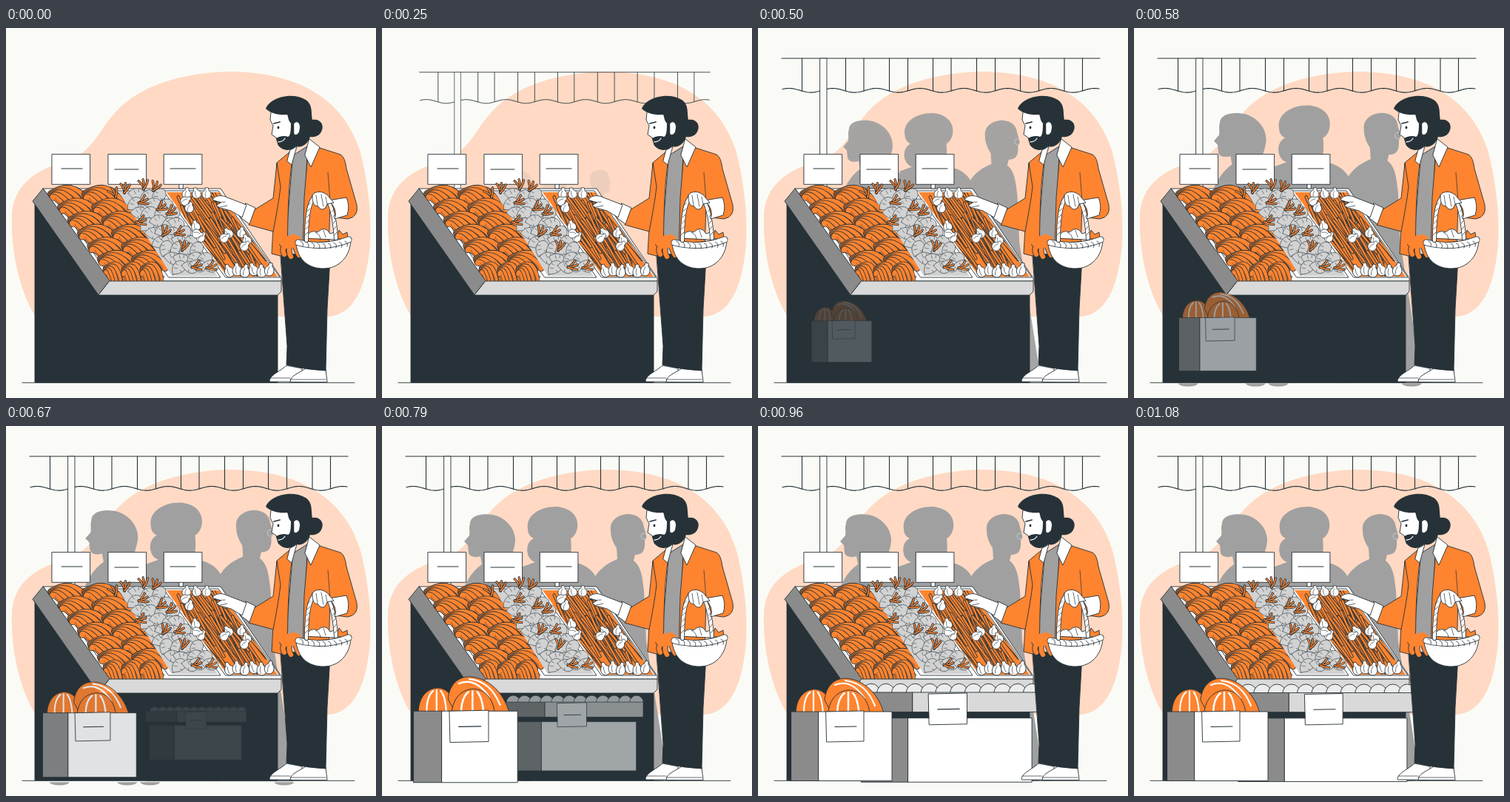
An HTML page for the animation above (1.12 s loop, 500 by 500 pixels).

```html
<!DOCTYPE html>
<html lang="en">
<head>
<meta charset="utf-8">
<title>Market stall</title>
<style>
  html, body { margin: 0; width: 100%; height: 100%; overflow: hidden; background: #fafbf6; }
  svg { display: block; width: 100vw; height: 100vh; }
</style>
</head>
<body>
<svg id="stage" viewBox="0 0 500 500" stroke-linejoin="round" stroke-linecap="round"></svg>
<script>
const INK = '#263238', ORANGE = '#ff8430', GREY = '#a0a0a0', SIDE = '#8b8b8b',
      PALE = '#d9d9d9', ROOT = '#d2d2d2', WHITE = '#fff', PEACH = '#ffd9c3';

let seed = 11;
const rnd = () => (seed = (seed * 16807) % 2147483647) / 2147483647;
const range = n => [...Array(n).keys()];
const each = (n, fn) => range(n).map(fn).join('');

const shape = (d, fill = 'none', stroke = INK, w = 0.9) =>
  `<path d="${d}" fill="${fill}" stroke="${stroke}" stroke-width="${w}"/>`;
const flat = (d, fill) => shape(d, fill, 'none');
const line = (d, w = 0.9, color = INK) => shape(d, 'none', color, w);
const rect = (x1, y1, x2, y2, fill) => shape(`M${x1} ${y1}H${x2}V${y2}H${x1}Z`, fill);
const at = (x, y, turn, sx, sy, body) =>
  `<g transform="translate(${x} ${y}) rotate(${turn}) scale(${sx} ${sy})">${body}</g>`;
const tube = (d, w, fill) => line(d, w) + line(d, w - 1.7, fill);
const group = (id, body) => `<g id="${id}">${body}</g>`;

// ---- backdrop
const blob = flat('M40 390C18 355 6 300 8 252C10 214 38 192 78 181C126 166 122 132 165 98' +
  'C205 68 262 59 305 59C392 60 455 94 478 165C492 215 497 280 488 322C480 365 462 388 436 390Z', PEACH);

function awning() {
  const edge = x => 84.3 - 2.8 * Math.cos((x - 42) / 59 * 2 * Math.PI);
  const wave = range(215).map(i => `${33 + i * 2} ${edge(33 + i * 2).toFixed(1)}`).join('L');
  const folds = [59.5, 118.5, 143, 177.5, 202.5, 236.5, 261, 295.5, 320.5, 354.5, 379.5, 414, 438.5];
  return line('M32 41H462', 1.1) + line('M' + wave, 1.1) +
    folds.map(x => line(`M${x} 41V${edge(x)}`, 1.1)).join('') +
    rect(84, 41, 93, 300, '#fafbf6');
}

function people() {
  const left = 'M119 132C119 119 140 117 154 121C171 127 180 141 180 154C180 166 174 172 176 183' +
    'C192 186 200 210 202 250L206 472H70L100 250C110 212 122 196 135 187L133 176C126 178 118 177 117 171' +
    'L116 161L111 156L118 148C119 142 117 137 119 132Z';
  const middle = 'M197 139C194 122 212 109 235 109C255 110 266 122 264 137C263 144 260 149 255 152' +
    'C257 168 254 176 255 183C278 187 290 198 293 216L285 475H190V190L207 184C194 180 192 158 205 152' +
    'C199 149 197 144 197 139Z';
  const right = 'M309 140C308 126 321 119 334 119C347 120 353 127 354 137L358 150L355 155C356 167 353 174 342 174' +
    'L340 182C351 190 352 207 354 222L357 290L383 455V475H280V225C285 202 296 189 318 180L317 165' +
    'C312 157 309 150 309 140Z';
  const feet = [76, 165, 195, 371].map(x => flat(`M${x - 12} 476a13 4 0 0 0 26 0Z`, GREY)).join('');
  return [left, middle, right].map(d => flat(d, GREY)).join('') + feet +
    `<circle cx="354" cy="149" r="4" fill="none" stroke="#fff" stroke-width=".6" opacity=".65"/>`;
}

// ---- stall
function bananas() {
  const bunch = each(5, k => tube(
    `M${1 + k * 0.6} ${10 + k * 1.4}Q${32 - k * 7} ${-10 + k * 5} ${51 - k * 8} ${20 + Math.min(k, 2) * 3}`, 8.4, ORANGE) +
    line(`M${6 + k * 0.5} ${8 + k * 2}Q${29 - k * 6} ${-4 + k * 5} ${48 - k * 8} ${19 + Math.min(k, 2) * 3}`, 0.6));
  let out = flat('M62 216L138 222L211 334L142 334Z', ORANGE);
  for (let r = 0; r < 6; r++)
    for (let c = 0; c < 2; c++) out += at(59 + r * 13.4 + c * 46, 214 + r * 17.6, 0, 1, 1, bunch);
  return out + each(3, c => at(135 + c * 25, 315, 12, 0.6, 1.08, bunch));
}

const root = shape('M-14 1C-9-9 4-11 9-3C12 2 8 9 1 9C-5 9-10 4-14 1Z', ROOT, INK, 0.6) +
  line('M-6-4l3 4M0-7l1 4M-2 8l-1-3', 0.5);
const leaves = [-34, -4, 26].map(a => at(0, 0, a, 1, 1, tube('M0 1Q2-6 0-13', 3.4, ORANGE))).join('');

function roots() {
  let out = flat('M152 221L207 221L286 335L224 335Z', ROOT);
  for (let r = 0; r < 9; r++)
    for (let c = 0; c < 4; c++) {
      const x = 163 + r * 8.7 + c * 14 + rnd() * 4, y = 224 + r * 12 + rnd() * 5;
      if (r || c > 0) out += at(x.toFixed(1), y.toFixed(1), Math.round(rnd() * 90 - 70), 0.95, 0.95, root);
    }
  const tufts = [[148, 228, -20], [160, 222, 10], [186, 217, 0], [199, 219, 30], [180, 236, 70], [205, 245, 60],
    [177, 262, 80], [218, 251, 60], [212, 280, 30], [229, 278, 70], [238, 300, 20], [252, 323, 80], [272, 324, 75]];
  return out + tufts.map(([x, y, a]) => at(x, y, a, 0.95, 0.95, leaves)).join('');
}

const bulb = shape('M-2-8L2-8L3-4C9-1 8 8 1 8C-7 9-9-1-3-4Z', WHITE, INK, 0.8) + line('M-1-3Q-3 2-1 6', 0.6);

function stalks() {
  const bed = 'M217 222H288L367 336H299Z';
  let sticks = '';
  for (let i = 0; i < 60; i++) {
    const y = 220 + rnd() * 80, x = 216 + (y - 217) * 0.69 + rnd() * 66;
    const len = 34 + rnd() * 16, tilt = 0.4 + rnd() * 0.5;
    sticks += tube(`M${x.toFixed(1)} ${y.toFixed(1)}l${(len * tilt).toFixed(1)} ${len.toFixed(1)}`, 4.2, ORANGE);
  }
  const bulbs = [[244, 223, 10], [257, 223, -15], [271, 223, 5], [243, 233, 60], [248, 242, 20],
    [256, 267, -10], [264, 282, 40], [259, 278, 100], [300, 277, -30], [296, 283, 60], [318, 276, 10], [325, 286, -20], [323, 294, 50]];
  return `<clipPath id="bed"><path d="${bed}"/></clipPath>` + flat(bed, ORANGE) +
    `<g clip-path="url(#bed)">${sticks}</g>` +
    bulbs.map(([x, y, a]) => at(x, y, a, 0.9, 0.9, bulb)).join('') +
    each(6, i => at(301 + i * 11, 328 - i % 2 * 2, -20 + i * 17 % 50, 0.95, 1.1, bulb));
}

function stall() {
  const signs = [[62, 75, 103, 190], [138, 147, 179, 191], [213.3, 222, 256, 190]];
  return flat('M39 234V479H367V355L140 342Z', INK) + line('M39 234V479H367V355') +
    shape('M50 217H290L372 338V342H140Z', WHITE) +
    shape('M59 220H132L214 337H142Z', WHITE) + shape('M138 220H207L290 337H220Z', WHITE) +
    shape('M213 220H287L370 337H297Z', WHITE) +
    signs.map(([x, a, b, y]) => rect(x + 21, 209, x + 26, 217, WHITE) +
      rect(x + 0.3, 170.6, x + 51.6, 211.3, WHITE) + line(`M${a} ${y}H${b}`, 1.2)).join('') +
    bananas() + roots() + stalks() +
    shape('M50 217L36 234L125 361L140 342Z', SIDE) +
    shape('M140 342H372V356L367 361H125Z', PALE);
}

// ---- goods in front
const tag = (x, y) => shape(`M${x} ${y}L${x + 51} ${y - 1}L${x + 51} ${y + 40}L${x + 1} ${y + 41}Z`, WHITE) +
  line(`M${x + 12} ${y + 20.5}L${x + 41} ${y + 20}`, 1.1);

function crate() {
  return each(12, i => shape(`M${143 + i * 19.4} 362a12 12.5 0 0 1 24 0Z`, '#ececec')) +
    rect(133, 361, 210, 387, SIDE) + rect(210, 361, 380, 387, PALE) +
    rect(142, 395, 204, 480, SIDE) + rect(204, 395, 368, 480, WHITE) + tag(231, 363);
}

function bag() {
  const pumpkin = shape('M-26 22C-27-5-12-16 2-16C19-15 28 2 28 22Z', ORANGE) +
    ['M-14 20Q-15-4-5-12', 'M0 20V-13', 'M14 20Q13-4 6-12'].map(d => line(d, 2.4, WHITE)).join('');
  return at(75, 371, 0, 0.92, 0.95, pumpkin) +
    shape('M90 370C92 350 104 341 118 341C143 342 163 362 170 388H100Z', ORANGE) +
    line('M104 350Q126 341 144 368M118 344Q146 347 158 378', 2.2, WHITE) +
    at(122, 373, 0, 1.05, 1, pumpkin) +
    rect(45, 386, 82, 479.5, SIDE) + rect(82, 386, 181, 479.5, WHITE) + tag(92, 386);
}

// ---- shopper
function man() {
  const legs = shape('M356 476C358 468 372 463 379 456L400 460V478H357Z', WHITE) +
    shape('M384 478C384 469 398 466 406 459L432 461L434 478Z', WHITE) +
    shape('M371 304L438 310L434 380L432 463Q405 462 379 455L380 430Z', INK) + line('M384 475H432M357 473H384', 0.7);
  const torso = shape('M388 172L407 160L404 290Q391 288 379 282Z', GREY) +
    shape('M384 167L366 182L359 305Q370 309 380 308L381 255Q382 205 388 172Z', ORANGE) +
    shape('M408 172L424 162L452 171Q458 174 460 190L474 239Q477 255 462 258L444 256L438 232L436 312L401 306L403 230Z', ORANGE) +
    line('M438 234L435 195', 0.7);
  const arm = shape('M366 183L361 230L335 246L328 266L361 275Q368 240 371 215Z', ORANGE) +
    shape('M324 237L337 243L329 265L318 257Z', WHITE) +
    shape('M279 232C282 226 292 225 299 229L325 239L319 256L304 247L289 243L284 240L290 236Z', WHITE) +
    line('M282 236L296 235M289 242L299 240', 0.7);
  const head = shape('M358 114L357 124L361 132L359 144L365 148L368 158L392 160L405 140V110Z', WHITE) +
    flat('M351 109C357 93 388 86 405 97C415 104 412 114 414 124C424 122 430 130 427 138C424 147 415 148 411 147' +
      'C408 156 401 162 392 160L386 146L387 130C381 127 382 121 380 117C370 118 358 116 351 109Z', INK) +
    flat('M365 149C370 146 377 145 381 147C385 146 385 136 385 127L396 144L393 158C387 167 375 167 368 159Z', INK) +
    shape('M389 129C394 123 399 130 397 137C397 143 391 147 389 143Z', WHITE) +
    line('M368 154Q374 154 377 149', 1.4, '#dfeaf0') + line('M362 129L370 127', 1.8) +
    `<ellipse cx="368" cy="134.5" rx="1.4" ry="1.9" fill="${INK}"/>` +
    shape('M384 165L393 160L389 174L386 185L380 180Z', WHITE) +
    shape('M410 150L424 161L412 188L404 172Z', WHITE);
  const handle = 'M406 287C406 255 409 226 424 225C439 226 444 256 446 284';
  const basket = tube('M373 288Q372 296 381 293M378 294Q372 299 376 306M385 291Q380 302 385 309M392 288Q390 298 396 307', 8, ORANGE) +
    flat('M368 291C366 284 373 278 382 281Q392 276 398 284L398 296L378 298Z', ORANGE) +
    shape('M405 284Q411 271 421 276Q431 266 438 278Q448 272 452 286Z', WHITE) + line('M418 276Q425 279 425 286M429 273L432 283', 0.7) +
    shape('M446 284L450 273L455 279L461 276L462 286Z', ORANGE) +
    shape('M392 292C395 315 410 325 429 325C451 325 465 308 466 287Z', WHITE) +
    tube('M395 290Q430 299 463 286', 9, WHITE) +
    each(9, i => line(`M${398 + i * 7.5} ${288 + Math.sin(i / 8 * 3.1) * 3}q5 2 3 7`, 0.8)) +
    tube(handle, 6, WHITE) +
    each(6, i => line(`M${404 + i * 0.7} ${280 - i * 8}l4-4M${444 - i * 0.8} ${280 - i * 8}l3-4`, 0.7));
  const hand = shape('M436 233L460 229Q465 240 461 253L444 258Q449 245 436 233Z', WHITE) +
    shape('M414 226C418 219 431 220 437 229L443 236L434 238L431 244Q425 247 422 241Q413 241 414 226Z', WHITE) +
    line('M419 226L421 240M426 225L429 241M432 228L434 238', 0.7);
  return legs + torso + arm + head + basket + hand;
}

const stage = document.getElementById('stage');
stage.innerHTML = blob + group('people', people()) + group('awning', awning()) + stall() +
  line('M22 479.3H471') + group('crate', crate()) + group('bag', bag()) + man();

// ---- motion: each part zooms in from half size with a slight overshoot
const LOOP = 1120, STEP = 1000 / 24;
// id, centre x, centre y, start step, length in steps
const parts = [
  ['awning', 247, 256, 0, 11],
  ['people', 240, 295, 2.7, 15],
  ['bag', 113, 410, 9.2, 12],
  ['crate', 257, 416, 13.9, 12.4],
].map(([id, ...rest]) => [document.getElementById(id), ...rest]);

const bezier = (t, a, b) => 3 * (1 - t) * (1 - t) * t * a + 3 * (1 - t) * t * t * b + t ** 3;

function ease(x) {
  if (x <= 0) return 0;
  if (x >= 1) return 1;
  let lo = 0, hi = 1;
  for (let i = 0; i < 24; i++) {
    const mid = (lo + hi) / 2;
    if (bezier(mid, 0.36, 0.5) < x) lo = mid; else hi = mid;
  }
  return bezier(lo, -0.01, 1.38);
}

function draw(now) {
  const step = Math.min(26, Math.floor((now % LOOP + 4.9) / STEP));
  for (const [el, cx, cy, start, length] of parts) {
    const p = ease((step - start) / length), s = 0.5 + p / 2;
    el.setAttribute('transform', `translate(${cx} ${cy}) scale(${s}) translate(${-cx} ${-cy})`);
    el.setAttribute('opacity', Math.max(0, Math.min(1, p)));
  }
}

const began = performance.now();
function tick() {
  draw(performance.now() - began);
  requestAnimationFrame(tick);
}
tick();
</script>
</body>
</html>
```
